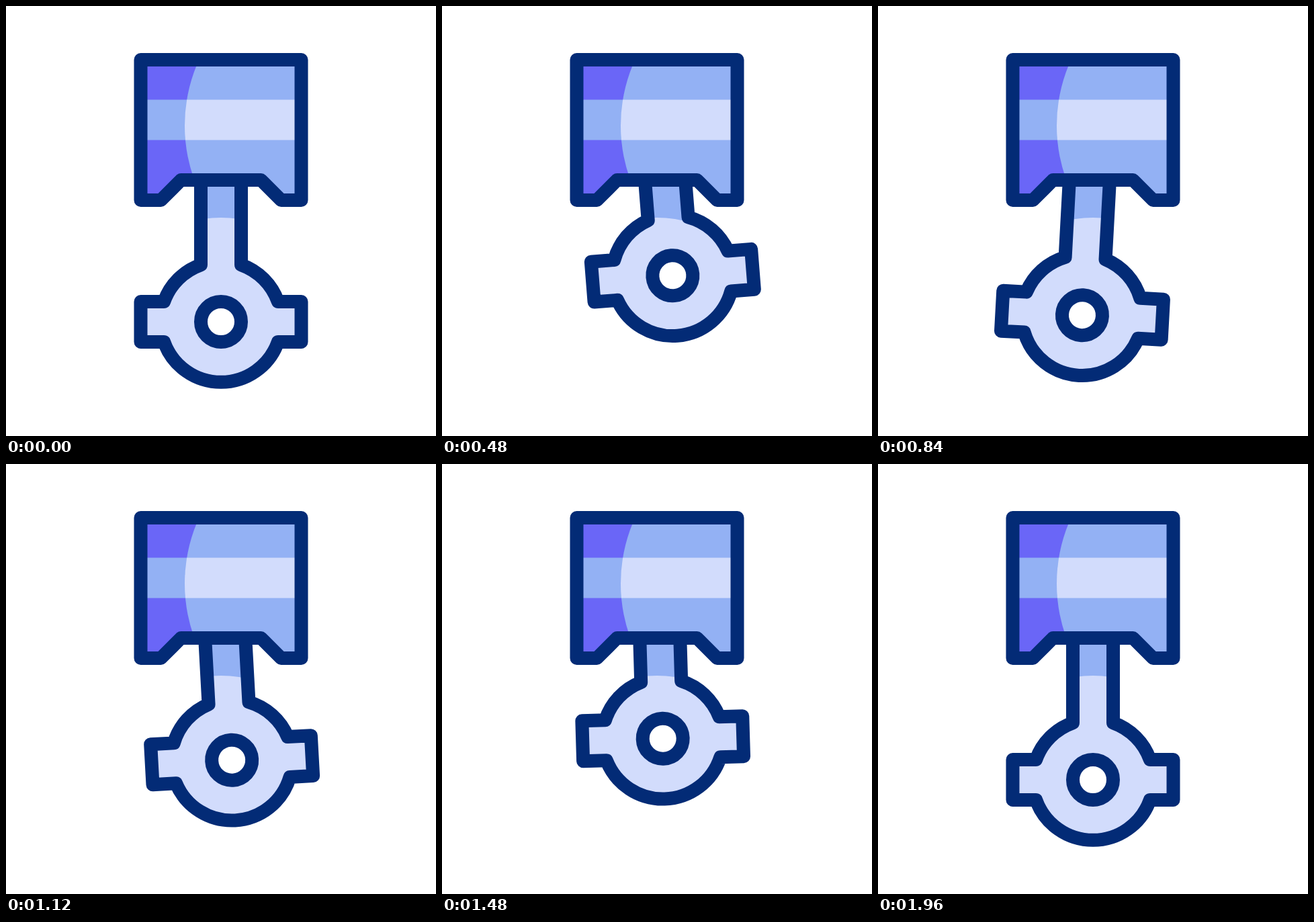
An HTML page without scripts for the animation above (2 s loop, 640 by 640 pixels).

```html
<!DOCTYPE html>
<html lang="en">
<head>
<meta charset="utf-8">
<title>Piston</title>
<style>
  @property --lift { syntax: "<length>"; inherits: true; initial-value: 0px; }
  @property --swing { syntax: "<angle>"; inherits: true; initial-value: 0deg; }

  html, body { margin: 0; width: 100%; height: 100%; overflow: hidden; background: #fff; }

  svg {
    --ink: #032b76;
    --light: #d2dcfc;
    --mid: #93b1f4;
    --violet: #6a66f7;
    display: block;
    width: 100%;
    height: 100%;
    animation: lift 2s infinite, swing 2s infinite;
  }

  /* the rod hangs from a pin inside the piston */
  .rod {
    transform-box: view-box;
    transform-origin: 320px 175px;
    transform: translateY(var(--lift)) rotate(var(--swing));
  }

  .line { fill: none; stroke: var(--ink); stroke-width: 20; stroke-linejoin: round; }
  .light { fill: var(--light); }
  .mid { fill: var(--mid); }
  .violet { fill: var(--violet); }

  @keyframes lift {
    0%, 4% { --lift: 0px; animation-timing-function: cubic-bezier(.32, 0, .64, 1); }
    21% { --lift: -70px; animation-timing-function: cubic-bezier(.364, 0, .68, 1); }
    48% { --lift: 0px; animation-timing-function: cubic-bezier(.32, 0, .64, 1); }
    66.85% { --lift: -70px; animation-timing-function: cubic-bezier(.364, 0, .636, 1); }
    98%, 100% { --lift: 0px; }
  }

  @keyframes swing {
    0%, 4% { --swing: 0deg; animation-timing-function: cubic-bezier(.3, .25, .6, 1); }
    21.7% { --swing: -5.2deg; animation-timing-function: cubic-bezier(.364, 0, .636, 1); }
    36.2% { --swing: 5.2deg; animation-timing-function: cubic-bezier(.35, 0, .65, .75); }
    48% { --swing: 0deg; animation-timing-function: cubic-bezier(.3, .35, .6, 1); }
    66.25% { --swing: -5.2deg; animation-timing-function: cubic-bezier(.364, 0, .636, 1); }
    86% { --swing: 5.2deg; animation-timing-function: cubic-bezier(.3, 0, .63, 1); }
    98%, 100% { --swing: 0deg; }
  }
</style>
</head>
<body>
<svg viewBox="0 0 640 640">
  <defs>
    <path id="rod" d="M290 230V385.2A90 90 0 0 0 235.2 440H200.5V500H235.2A90 90 0 0 0 404.8 500H439.5V440H404.8A90 90 0 0 0 350 385.2V230Z"/>
    <path id="head" d="M200.5 80H439.5V289H409.5L379.5 259H260.5L230.5 289H200.5Z"/>
    <clipPath id="in-rod"><use href="#rod" class="rod"/></clipPath>
    <clipPath id="in-head"><use href="#head"/></clipPath>
    <clipPath id="in-band"><rect x="200" y="139.5" width="240" height="60"/></clipPath>
  </defs>

  <use href="#rod" class="rod light"/>
  <!-- the shade stays under the head while the rod moves through it -->
  <g clip-path="url(#in-rod)">
    <path class="mid" d="M220 150H420V347.5A170 170 0 0 0 220 347.5Z"/>
  </g>
  <g class="rod">
    <use href="#rod" class="line"/>
    <circle class="line" cx="320" cy="470" r="30" style="fill:#fff"/>
  </g>

  <g clip-path="url(#in-head)">
    <rect class="violet" x="200" y="80" width="240" height="210"/>
    <rect class="mid" x="200" y="139.5" width="240" height="60"/>
    <circle class="mid" cx="502" cy="178" r="236"/>
    <circle class="light" cx="502" cy="178" r="236" clip-path="url(#in-band)"/>
  </g>
  <use href="#head" class="line"/>
</svg>
</body>
</html>
```
